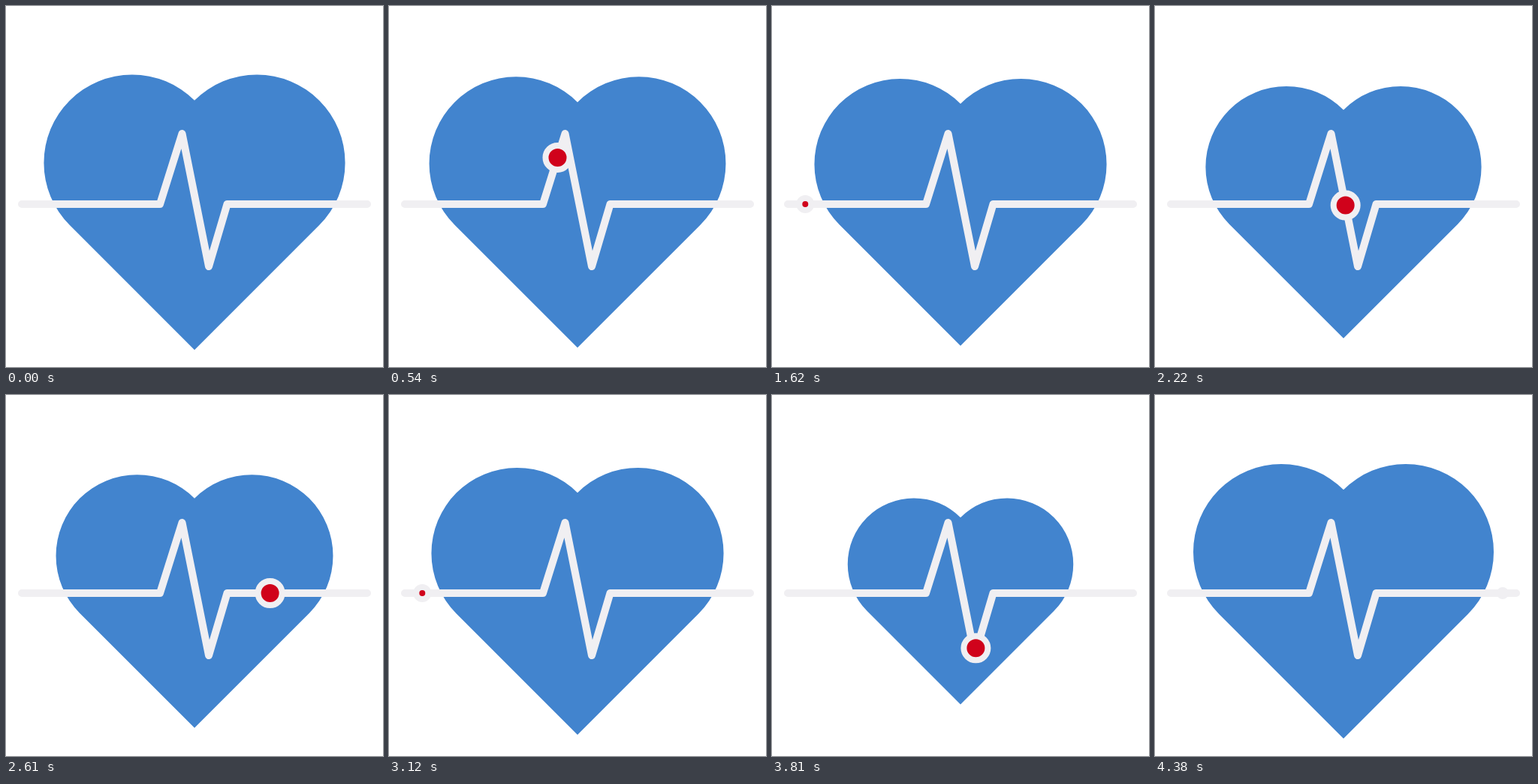
Recreate the animation shown at these times as an HTML page. Size 502x481 px, loop 4410 ms.

```html
<!DOCTYPE html>
<html lang="en">
<head>
<meta charset="utf-8">
<title>Heartbeat</title>
<style>
html, body { margin: 0; width: 100%; height: 100%; overflow: hidden; background: #fff; }
svg { display: block; width: 100%; height: 100%; }
</style>
</head>
<body>
<svg viewBox="0 0 502 481">
  <path id="heart" fill="#4284ce" d="M251 458.2 L84.9 292.1 A117.5 117.5 0 0 1 251 125.8 A117.5 117.5 0 0 1 417.1 292.1 Z"/>
  <polyline id="line" fill="none" stroke="#f0eff2" stroke-width="10" stroke-linecap="round" stroke-linejoin="round"/>
  <circle id="dot" fill="#d0021b" stroke="#f0eff2" stroke-width="8"/>
</svg>
<script>
const LOOP = 4410, BEAT = 1500, END = 1440, STEP = 30;
const LOW = 0.749, REST = 0.9;
const points = [[21, 264], [205, 264], [234.5, 170], [270, 347], [294.5, 264], [481, 264]];
// [ms, distance along the line]
const travel = [[0, 0], [120, 23.3], [720, 380], [810, 467], [1050, 580], [1380, 718], [END, 736]];

const heart = document.getElementById('heart');
const line = document.getElementById('line');
const dot = document.getElementById('dot');
line.setAttribute('points', points.join(' '));

const clamp = (v, a, b) => Math.min(b, Math.max(a, v));
const mix = (a, b, k) => a + (b - a) * k;
const sineIn = k => 1 - Math.cos(k * Math.PI / 2);
const sineOut = k => Math.sin(k * Math.PI / 2);
const sineInOut = k => (1 - Math.cos(k * Math.PI)) / 2;

const slopes = travel.slice(1).map(([t, d], i) => (d - travel[i][1]) / (t - travel[i][0]));
const tangents = travel.map((_, i) => {
  if (i === 0) return 0;
  if (i === slopes.length) return 0.2;
  const a = slopes[i - 1], b = slopes[i];
  return 2 * a * b / (a + b);
});

// Smooth monotone curve through the travel keys
function distance(t) {
  if (t >= END) return travel[travel.length - 1][1];
  const i = travel.findIndex(key => key[0] > t) - 1;
  const [t0, d0] = travel[i], [t1, d1] = travel[i + 1];
  const h = t1 - t0, k = (t - t0) / h, k2 = k * k, k3 = k2 * k;
  return (2 * k3 - 3 * k2 + 1) * d0 + (k3 - 2 * k2 + k) * h * tangents[i]
       + (3 * k2 - 2 * k3) * d1 + (k3 - k2) * h * tangents[i + 1];
}

function pointAt(d) {
  d = Math.max(0, d);
  for (let i = 1; i < points.length; i++) {
    const [x0, y0] = points[i - 1], [x1, y1] = points[i];
    const len = Math.hypot(x1 - x0, y1 - y0);
    if (d <= len) return [mix(x0, x1, d / len), mix(y0, y1, d / len)];
    d -= len;
  }
  return points[points.length - 1];
}

// The dot cuts the corners a little
function dotAt(d) {
  const a = pointAt(d - 10), b = pointAt(d + 10);
  return [(a[0] + b[0]) / 2, (a[1] + b[1]) / 2];
}

function heartScale(t) {
  if (t < 325) return mix(1, REST, sineInOut(t / 325));
  if (t < 615) return mix(REST, 1, sineInOut((t - 325) / 290));
  if (t < 810) return mix(1, LOW, sineIn((t - 615) / 195));
  return mix(LOW, 1, sineOut(clamp((t - 810) / (END - 810), 0, 1)));
}

function draw(time) {
  const t = time % BEAT;
  heart.setAttribute('transform',
    `translate(251 274.7) scale(${heartScale(t)}) translate(-251 -274.7)`);
  const r = 16 * clamp(Math.min(t, END - t) / 240, 0, 1);
  const [x, y] = dotAt(distance(t));
  dot.setAttribute('cx', x);
  dot.setAttribute('cy', y);
  dot.setAttribute('r', r);
  dot.style.display = r > 0 ? '' : 'none';
}

const start = performance.now();
function tick() {
  const time = (performance.now() - start) % LOOP;
  draw(Math.floor(time / STEP) * STEP);
  requestAnimationFrame(tick);
}
tick();
</script>
</body>
</html>
```
